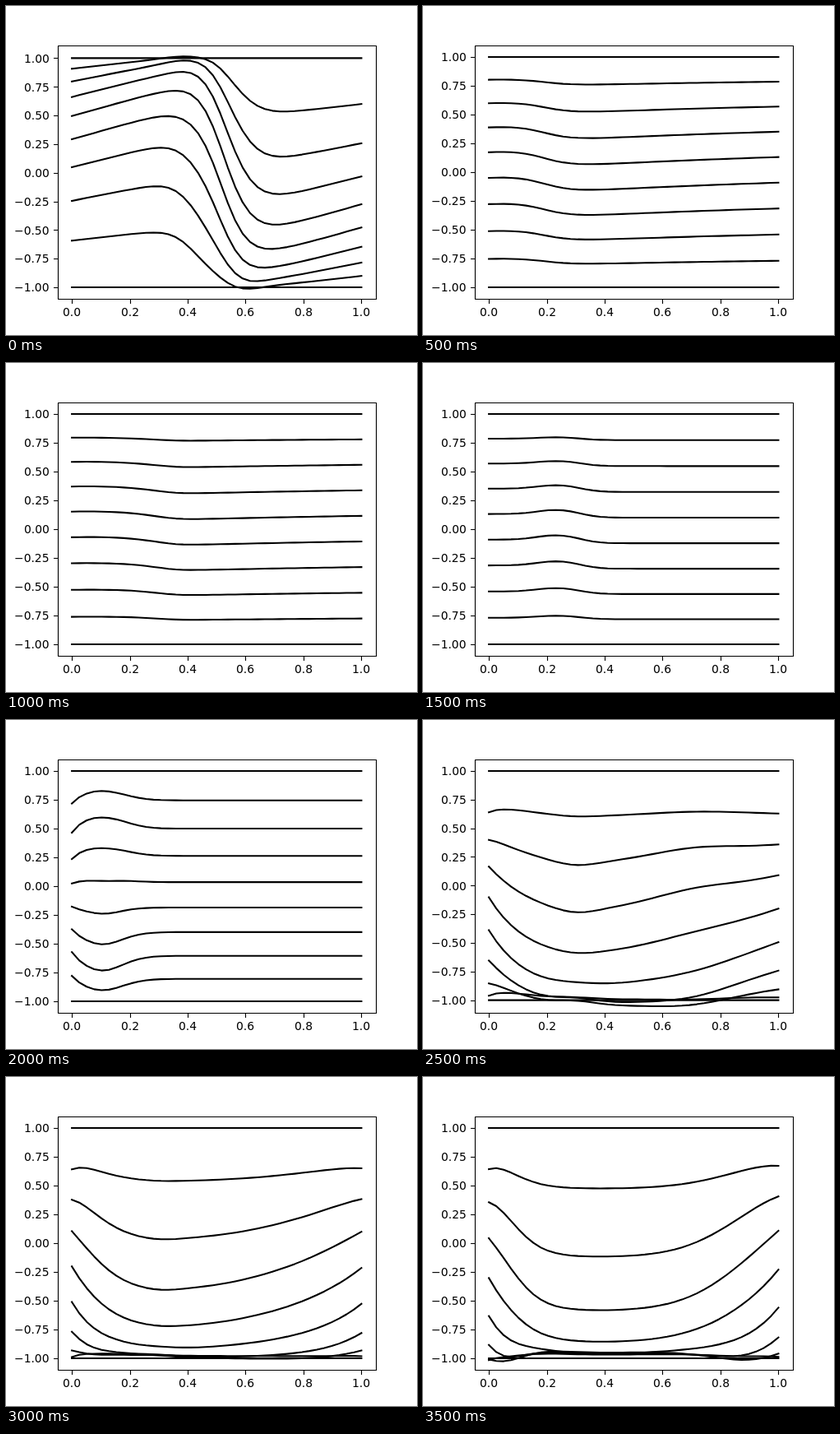
Write an HTML page with a canvas that moves like this. It is 500 px wide and 400 px high and loops after 4000 ms.

```html
<!DOCTYPE html>
<html>
<head>
<meta charset="utf-8">
<style>
html, body { margin: 0; width: 100%; height: 100%; overflow: hidden; background: #fff; }
canvas { display: block; }
</style>
</head>
<body>
<canvas id="plot" width="500" height="400"></canvas>
<script>
const ctx = document.getElementById('plot').getContext('2d');
const { exp, tanh } = Math;
const STEP = 500, SAMPLES = 40, CURVES = 10, TOP = 62, HEIGHT = 280;

const toX = x => 80.1 + 352.3 * x;
const bump = (x, centre, width) => exp(-(((x - centre) / width) ** 2));
const step = (x, centre, width) => tanh((x - centre) / width);

// Every curve starts as a level z in [-1, 1] and is displaced by
// (1 - z²) times a polynomial in z whose coefficients depend on x.
function wave(x) {
  return [
    .03 + .72 * (x - .53) - .75 * step(x, .52, .094),
    -.09 + .53 * bump(x, .505, .12),
    -.25 * bump(x, .45, .08),
    0
  ];
}

function dip(x) {
  return [.066 + .16 * x - .04 * x * x - .083 * (1 + step(x, .19, .1)), 0, 0, 0];
}

function ripple(x) {
  return [.0045 - .016 * step(x, .33, .06) + .038 * bump(x, .235, .095), -.01 * bump(x, .235, .1), 0, 0];
}

function bulge(x) {
  return [
    -.0765 - .022 * bump(x, .11, .07),
    -.008 + .3 * bump(x, .1, .11) - .22 * exp(-x / .03),
    0,
    0
  ];
}

function sag(x) {
  const tilt = .3 - .15 * bump(x, .3, .1) + .25 * bump(x, .7, .2);
  return [
    -.87 + .1 * x + .42 * x * x + .625 * exp(-x / .14),
    tilt,
    .45 - .72 * exp(-x / .06) - .6 * x ** 3,
    -1.25 * tilt
  ];
}

function bowl(x) {
  const tilt = -.55 + 1.05 * (bump(x, 0, .13) + bump(x, 1, .25));
  return [
    -.95 + .475 * exp(-x / .1) + .55 * exp((x - 1) / .17),
    tilt,
    .5 - .5 * exp(-x / .04) - .5 * exp((x - 1) / .08),
    -1.1 * tilt
  ];
}

const between = (f, g) => x => {
  const other = g(x);
  return f(x).map((v, i) => (v + other[i]) / 2);
};

const state = (shape, lo = -1, hi = 1) => ({ shape, lo, hi });
const states = [
  state(wave, -1, 1.01), state(dip), state(between(dip, ripple)), state(ripple),
  state(bulge), state(sag, -1.01, 1), state(between(sag, bowl)), state(bowl)
];

function line(points) {
  ctx.beginPath();
  points.forEach(([x, y]) => ctx.lineTo(x, y));
  ctx.stroke();
}

// Places text on whole pixels; align is the share of its width left of x.
function label(text, x, y, align) {
  ctx.fillText(text, Math.round(x - align * ctx.measureText(text).width), Math.round(y));
}

function draw({ shape, lo, hi }) {
  const toY = v => TOP + (hi - v) / (hi - lo) * HEIGHT;
  ctx.fillStyle = '#fff';
  ctx.fillRect(0, 0, 500, 400);
  ctx.fillStyle = ctx.strokeStyle = '#000';
  ctx.font = '13.89px "DejaVu Sans", sans-serif';

  ctx.lineWidth = 2.08;
  ctx.lineCap = 'square';
  ctx.lineJoin = 'round';
  for (let k = 0; k < CURVES; k++) {
    const z = 1 - 2 * k / (CURVES - 1);
    line(Array.from({ length: SAMPLES }, (_, i) => {
      const x = i / (SAMPLES - 1);
      const [a, b, c, d] = shape(x);
      return [toX(x), toY(z + (1 - z * z) * (a + z * (b + z * (c + z * d))))];
    }));
  }

  ctx.lineWidth = 1.11;
  ctx.lineCap = 'butt';
  ctx.strokeRect(63.5, 48.5, 387, 308);

  for (let i = 0; i <= 5; i++) {
    const x = toX(i / 5), snapped = Math.round(x) + .5;
    line([[snapped, 357], [snapped, 362]]);
    label((i / 5).toFixed(1), x, 377, .5);
  }
  for (let i = -4; i <= 4; i++) {
    const y = toY(i / 4), snapped = Math.round(y) + .5;
    line([[58, snapped], [63, snapped]]);
    label((i / 4).toFixed(2).replace('-', '\u2212'), 52.8, y + 5.3, 1);
  }
}

const start = performance.now();
function tick() {
  const elapsed = Math.max(0, performance.now() - start);
  draw(states[Math.floor(elapsed / STEP) % states.length]);
  requestAnimationFrame(tick);
}
tick();
</script>
</body>
</html>
```
